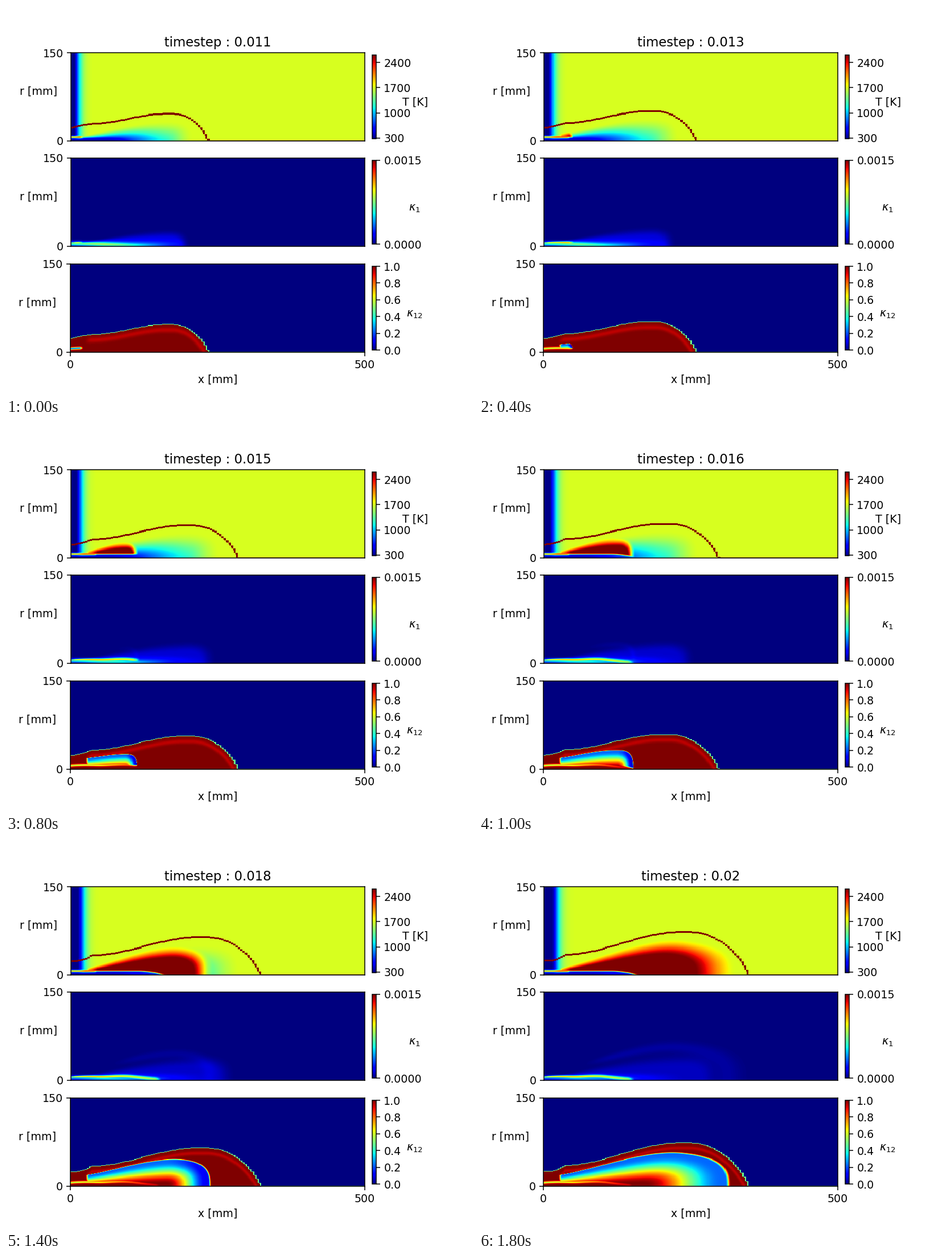
A matplotlib script for the animation above (2000 ms loop, 820 by 683 pixels).

```python
import numpy as np
import matplotlib.pyplot as plt
from matplotlib.animation import FuncAnimation

W, H, DPI = 820, 683, 128
PT = 820 / 6 / DPI  # point scale of a six inch wide layout

plt.rcParams.update({
    "font.family": "DejaVu Sans", "font.size": 10 * PT,
    "axes.titlesize": 12 * PT, "axes.titlepad": 6 * PT,
    "axes.linewidth": 0.8 * PT,
})
for axis in "xy":
    plt.rcParams[axis + "tick.major.size"] = 3.5 * PT
    plt.rcParams[axis + "tick.major.pad"] = 3.5 * PT
    plt.rcParams[axis + "tick.major.width"] = 0.8 * PT

# Cells of 1 mm; the outer front moves in columns of STEP cells
NX, NY, STEP = 500, 150, 4
xs = np.arange(NX) + 0.5
X, Y = np.meshgrid(xs, np.arange(NY) + 0.5)
AMBIENT = 0.613


def smooth(v):
    v = np.clip(v, 0, 1)
    return v * v * (3 - 2 * v)


def bump(v, centre, width):
    return np.exp(-((v - centre) / width) ** 2)


def shifted(mask, dx, dy):
    """Mask seen from dx, dy cells further on, edges repeated."""
    rows = np.clip(np.arange(NY) + dy, 0, NY - 1)
    cols = np.clip(np.arange(NX) + dx, 0, NX - 1)
    return mask[np.ix_(rows, cols)]


def rim(mask, dx, dy):
    inner = shifted(mask, dx, 0) & shifted(mask, -dx, 0) & shifted(mask, 0, dy)
    return mask & ~inner


def outline(x, s):
    """Height of the outer front above the axis."""
    tip, peak = 235 + 114 * s, 169 + 74 * s
    top = 47 + 20 * s + 7 * s ** 4
    lip_end = 30 + 5.5 * s
    lip_start = 22 + 3 * s
    lip = np.clip(x / 36, 0, 1) ** (0.6 + 2.4 * s)
    rise = smooth((x - 36) / (peak - 36) * 1.07)
    rear = lip_start + (lip_end - lip_start) * lip + (top - lip_end) * rise
    u = np.clip((x - peak - 5) / (tip - peak - 5), 0, 1)
    return rear * (1 - u * u) ** 0.77


def nested(start, foot, top, peak, core, tip):
    """Teardrop coordinate: 0 in the core, 1 on the surface."""
    u = np.clip((X - start) / (peak - start), 0, 1)
    height = foot + (top - foot) * np.sin(np.pi / 2 * u ** 1.2)
    v = np.clip((X - core) / (tip - core), 0, 3)
    return ((Y / height) ** 3 + v ** 3) ** (1 / 3), v


def fields(s):
    """The three normalised maps at progress s from 0 to 1."""
    column = (xs // STEP + 0.5) * STEP
    inside = Y < outline(column, s) + 0.6
    edge = outline(xs, s)
    depth = (edge - Y) / np.sqrt(1 + np.gradient(edge, xs) ** 2)

    # Diluted cloud and flame, both growing teardrops
    peak = 169 + 74 * s
    cloud_tip = 210 + 103 * s
    cq, _ = nested(0, 6, 35 + 23 * s, peak + 5, peak - 8, cloud_tip)
    cloud = 1 - smooth(cq)

    grown = 0.1 * s + 1.78 * s ** 2 - 0.88 * s ** 3
    tip = 20 + 292 * grown
    top = 10 + 48 * grown
    body = 0.72 * tip + 13, min(0.82 * tip, 160), tip
    fq, fv = nested(28, 9 + 10 * smooth(2 * s), top, *body)
    hq, _ = nested(28, min(top, 12), top, *body)

    # Cold fuel core below the flame and the thin sheet at the nozzle
    core_y = 5 * (1 - smooth((X - 115) / 55)) - 3 * smooth((X - 140) / 30)
    above = smooth((Y - core_y) / 3.5)
    sheet_y = 6.3 + 0.03 * np.minimum(X, 40) + 0.5 * np.sin(X / 11)
    sheet_y = sheet_y * (1 - 0.9 * smooth((X - 95) / 75))
    gate = smooth((X - 26) / 5)
    reach = min(tip, 150)

    # Temperature
    layer = np.clip((X - 6 - 8 * s) / (10 + 2 * s), 0, None)
    wall = AMBIENT - (AMBIENT - 0.01) * np.exp(-layer ** 1.5)
    axis = 0.04 + 0.42 * smooth((X / cloud_tip - 0.2) / 0.75)
    temp = np.minimum(wall, AMBIENT - (AMBIENT - axis) * cloud)
    jet = smooth((8 - Y) / 5) * (1 - smooth((X - 50) / 60))
    temp = temp - (temp - 0.06) * jet * 0.85
    hot = 1 - smooth((hq - 0.6) / 0.5)
    hot = hot * above * gate * (0.55 + 0.45 * smooth((X - 28) / 22))
    sheet = bump(Y, 6.8, 1.7) * (1 - smooth((X - min(tip, 45) + 6) / 8))
    hot = np.maximum(hot, 0.74 * sheet)
    temp = temp + (1.02 - temp) * hot
    temp[rim(inside, 3, 3)] = 1

    # First scalar
    old = 0.36 * (1 - smooth((X - 50) / 130)) * (1 - 0.6 * s)
    old = old * bump(Y, 5 - 3 * smooth(X / 130), 3.6)
    lit = 0.68 * (1 - X / 330) * (0.75 + 0.25 * smooth(X / 12))
    burn = 1 - smooth((X - reach + 8) / 14)
    thin = lit * burn * bump(Y, sheet_y - 0.6, 1.5 + X / 90)
    tail = 0.1 * bump(Y, 4, 7) * (1 - smooth((X - 120) / 130))
    haze = (0.085 - 0.03 * s) * smooth(cloud * 1.6) * smooth(X / 60)
    ring = 0.03 * s * bump(fq, 1, 0.15) * smooth((X - 60) / 60)
    first = np.maximum(thin, old) + haze + tail * smooth(cloud * 2) + ring

    # Second scalar
    burnt = 0.77 * smooth((fq - 0.1) / 0.83)
    burnt += 0.2 * (1 - s) ** 0.3 * smooth(fv)
    dip = burnt * (1 - smooth((fq - 0.985) / 0.055)) * above * gate
    fade = 0.45 * (1 - smooth(X / 190)) + 0.35 * (1 - smooth(s * 5))
    line = fade * bump(Y, sheet_y, 1.8) * (1 - smooth((X - reach + 5) / 7))
    streak = 0.055 * bump(depth, 9, 4.5 - 1.5 * s) * smooth((X - 22) / 15)
    second = 1 - np.maximum(np.maximum(dip, line), streak)
    second = np.where(inside, second, 0)
    second[rim(inside, 2, 1)] = 0.48
    return [np.clip(f, 0, 1) for f in (temp, first, second)]


fig = plt.figure(figsize=(W / DPI, H / DPI), dpi=DPI, facecolor="white")


def box(left, top, right, bottom):
    return fig.add_axes([left / W, 1 - bottom / H,
                         (right - left) / W, (bottom - top) / H])


def label(x, y, text, ha, va):
    fig.text(x / W, 1 - y / H, text, ha=ha, va=va)


# left, top, low, high, ticks, tick format, bar label, label x, label drop
PANELS = [
    (114, 82, 279, 2607, range(300, 2401, 700), "%d", "T [K]", 719, 0),
    (114, 267, 0, 0.0015, [0, 0.0015], "%.4f", r"$\kappa_1$", 717, 2),
    (113, 453, 0, 1, np.linspace(0, 1, 6), "%.1f", r"$\kappa_{12}$", 717, 2),
]

axes, images = [], []
for left, top, low, high, ticks, fmt, name, name_x, drop in PANELS:
    ax = box(left, top, 630, top + 154.7)
    im = ax.imshow(np.zeros((NY, NX)), cmap="jet", vmin=low, vmax=high,
                   origin="lower", extent=[0, 500, 0, 150], aspect="auto",
                   interpolation="nearest")
    ax.set_xticks([])
    ax.set_yticks([0, 150])
    bar = fig.colorbar(im, cax=box(642.5, top + 4, 650, top + 151.2),
                       ticks=list(ticks), format=fmt)
    bar.ax.minorticks_off()
    middle = top + 77.4
    label(2 * left - 138, middle, "r [mm]", "right", "bottom")
    label(name_x, middle + drop, name, "center", "top")
    axes.append(ax)
    images.append(im)

axes[2].set_xticks([0, 500])
axes[2].set_xlabel("x [mm]", labelpad=3.4 * PT)
title = axes[0].set_title("")


def update(i):
    title.set_text(f"timestep : {(11 + i) / 1000:g}")
    for im, data, panel in zip(images, fields(i / 9), PANELS):
        low, high = panel[2:4]
        im.set_data(low + (high - low) * data)
    return [title, *images]


anim = FuncAnimation(fig, update, frames=10, interval=200,
                     repeat=True, repeat_delay=0, blit=False)
plt.show()
```
